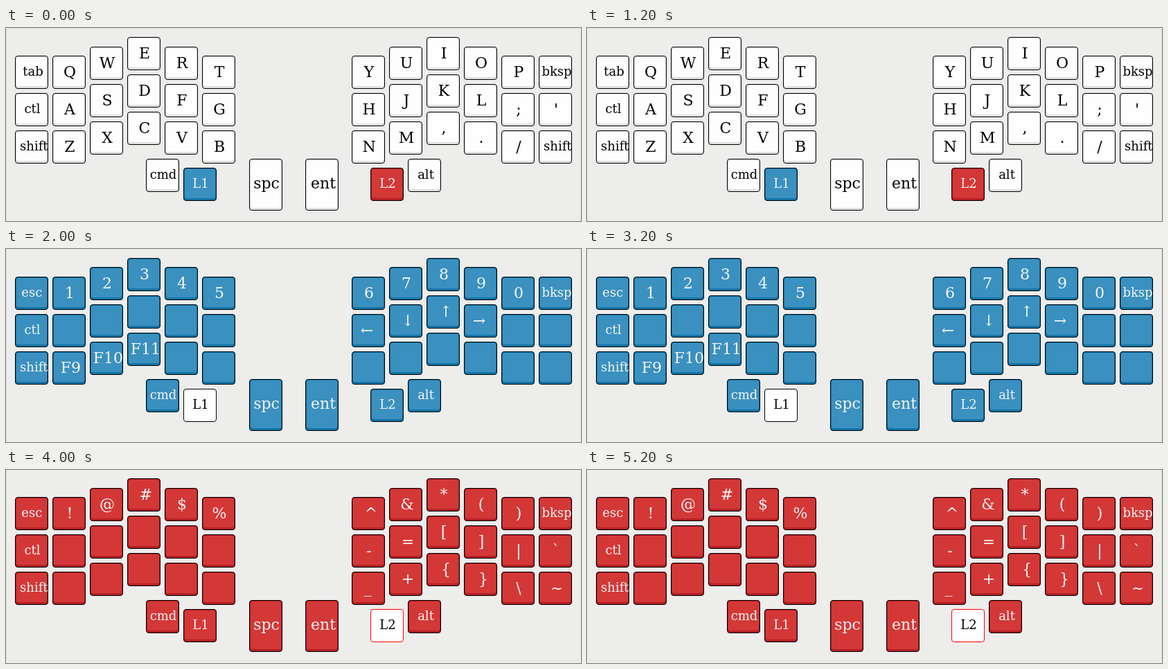
An HTML page with a canvas that plays this animation: 830x279 px, repeating every 6 s.

```html
<!DOCTYPE html>
<html lang="en">
<head>
<meta charset="utf-8">
<title>Keyboard layers</title>
<style>
html, body { margin: 0; width: 100%; height: 100%; overflow: hidden; background: #edeeec; }
canvas { display: block; }
</style>
</head>
<body>
<canvas id="stage" width="830" height="279"></canvas>
<script>
const ctx = document.getElementById("stage").getContext("2d");
const UNIT = 54, MARGIN = 13, CAP = 48, HOLD = 2000;

const white = { cap: "#fdfefd", side: "#dfe0df", edge: "#000", text: "#000" };
const blue = { cap: "#3a90bf", side: "#1374a8", edge: "#000", text: "#f4f6f7" };
const red = { cap: "#d33837", side: "#b41f25", edge: "#000", text: "#f7f3f3" };
const held = { cap: "#fff", side: "#fff", edge: "#000", text: "#000" };

// Labels run row by row, then the thumb keys; "nil" is a blank cap.
const THUMBS = "cmd L1 spc ent L2 alt";
const layers = [
  { top: 13, style: white, special: { L1: blue, L2: red }, labels:
    `tab Q W E R T Y U I O P bksp
     ctl A S D F G H J K L ; '
     shift Z X C V B N M , . / shift ${THUMBS}` },
  { top: 12.5, style: blue, special: { L1: held }, labels:
    `esc 1 2 3 4 5 6 7 8 9 0 bksp
     ctl nil nil nil nil nil ← ↓ ↑ → nil nil
     shift F9 F10 F11 nil nil nil nil nil nil nil nil ${THUMBS}` },
  { top: 12, style: red, special: { L2: { ...held, edge: "#f00" } }, labels:
    `esc ! @ # $ % ^ & * ( ) bksp
     ctl nil nil nil nil nil - = [ ] | \`
     shift nil nil nil nil nil _ + { } \\ ~ ${THUMBS}` }
].map(layer => ({ ...layer, labels: layer.labels.split(/\s+/) }));

// Key positions in key units.
const stagger = [0.5, 0.5, 0.25, 0, 0.25, 0.5];
const keys = [];
for (let row = 0; row < 3; row++) {
  for (let col = 0; col < 12; col++) {
    keys.push({ x: col < 6 ? col : col + 3, y: row + stagger[col < 6 ? col : 11 - col], h: 1 });
  }
}
for (const [x, y, h] of [[3.5, 3.25, 1], [4.5, 3.5, 1], [6.25, 3.25, 1.5],
                         [7.75, 3.25, 1.5], [9.5, 3.5, 1], [10.5, 3.25, 1]]) {
  keys.push({ x, y, h });
}

// Optical offsets of labels from the cap centre.
const nudge = { shift: 2.3, bksp: 1, tab: 1, esc: -0.7, ent: 1, alt: 1, F9: 1.3, F10: 1.3, F11: 1.3,
  "#": 2, "^": 3, "&": 1, "=": 2, "+": 2, "{": 3, "}": 3, "_": -2, "~": 1,
  "←": -3, "↓": 2, "↑": 3, "→": -3 };
const small = /^(tab|esc|ctl|shift|bksp|cmd|alt|L[12])$/;

function roundRect(x, y, w, h, r) {
  ctx.beginPath();
  ctx.roundRect(x, y, w, h, r);
}

function drawKey(key, label, style, top) {
  const x = Math.round(MARGIN + key.x * UNIT);
  const y = Math.round(top + key.y * UNIT);
  const h = key.h * UNIT - (UNIT - CAP);
  roundRect(x + 0.5, y + 0.5, CAP - 1, h - 1, 3.5);
  ctx.fillStyle = style.side;
  ctx.fill();
  ctx.strokeStyle = style.edge;
  ctx.stroke();
  roundRect(x + 2, y + 2, CAP - 4, h - 6, 3);
  ctx.fillStyle = style.cap;
  ctx.fill();
  if (label === "nil") return;
  const size = small.test(label) ? 18 : 22;
  const baseline = key.h > 1 ? 43 : size === 18 ? 29 : 31;
  ctx.font = `${size}px "DejaVu Serif", serif`;
  ctx.fillStyle = style.text;
  ctx.fillText(label, x + 25 + (nudge[label] || 0), y + baseline);
}

function drawPlate(index) {
  ctx.fillStyle = "#edeeec";
  ctx.fillRect(0, 0, 830, 279);
  ctx.strokeStyle = "#dcdddc";
  const top = index === 0 ? 0.5 : -20;
  const bottom = index === 2 ? 275.5 : 300;
  roundRect(0.5, top, 829, bottom - top, 6);
  ctx.stroke();
}

let shown = -1;
function frame(now) {
  const index = Math.floor(now / HOLD) % layers.length;
  if (index !== shown) {
    shown = index;
    const { top, style, special, labels } = layers[index];
    ctx.lineWidth = 1;
    ctx.textAlign = "center";
    drawPlate(index);
    keys.forEach((key, i) => drawKey(key, labels[i], special[labels[i]] || style, top));
  }
  requestAnimationFrame(frame);
}
frame(performance.now());
</script>
</body>
</html>
```
